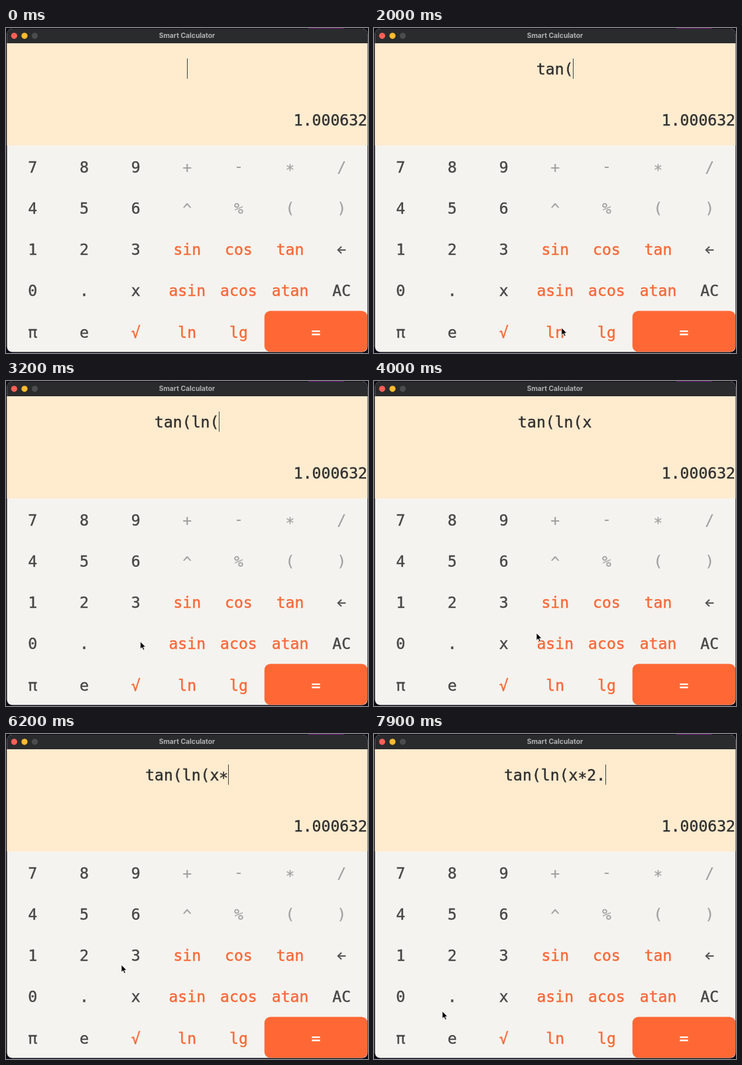
An HTML page for the animation above (8000 ms loop, 546x490 px).

```html
<!DOCTYPE html>
<html lang="en">
<head>
<meta charset="utf-8">
<title>Smart Calculator</title>
<style>
  html, body { margin: 0; width: 100%; height: 100%; overflow: hidden; background: #0d0b18; }
  svg { display: block; width: 546px; height: 490px; }
  text {
    font: 23.1px "DejaVu Sans Mono", "Noto Sans Mono", monospace; text-anchor: middle; white-space: pre;
    color: #303030; fill: currentColor; stroke: currentColor; stroke-width: .4px;
  }
  .digit { color: #474747; }
  .op { color: #a0a0a0; stroke-width: .2px; }
  .fn { color: #f86836; }
  .equals { color: #fff; }
  .back { font: 500 17px Inter, sans-serif; color: #474747; }
  .title { font: 700 10.3px Inter, sans-serif; color: #b1b1b2; stroke: none; }
</style>
</head>
<body>
<svg viewBox="0 0 546 490">
  <clipPath id="frame"><rect x="1.5" y="1" width="543.8" height="487.5" rx="8"/></clipPath>
  <path d="M456 .5H510" stroke="#6a1378"/>
  <g clip-path="url(#frame)">
    <rect width="546" height="490" fill="#f5f3ef"/>
    <rect width="546" height="23" fill="#2a2b2d"/>
    <rect y="23" width="546" height="154" fill="#ffebce"/>
    <rect x="389.8" y="426.4" width="155.5" height="62.1" rx="9" fill="#ff6835"/>
  </g>
  <circle cx="12.3" cy="11.8" r="4.6" fill="#fe5f57"/>
  <circle cx="27.9" cy="11.8" r="4.6" fill="#febc2e"/>
  <circle cx="43.4" cy="11.8" r="4.6" fill="#4b4c4e"/>
  <text class="title" x="273" y="15">Smart Calculator</text>
  <text id="entry" x="272.7" y="70"></text>
  <text x="545" y="147" style="text-anchor:end">1.000632</text>
  <path id="caret" d="M0 46V76.5" stroke="#444"/>
  <g id="keys"></g>
  <path id="pointer" d="M0 0V11.2L2.6 8.8 4.4 12.9 6.3 12.1 4.6 8.1H8Z" fill="#000" stroke="#fff" stroke-width=".8"/>
</svg>
<script>
const LOOP = 8000, FRAME = 100, BLINK = 530, CHAR = 13.91;
const HOLD = 200, ARRIVE = 250, LEAVE = 100; // ms before a label is typed
const $ = id => document.getElementById(id);

const rows = ['7 8 9 + - * /', '4 5 6 ^ % ( )', '1 2 3 sin cos tan ←', '0 . x asin acos atan AC', 'π e √ ln lg'];
const lift = { '*': -4, '-': 2, '^': -2, '←': 2 };
const kinds = [['back', /←/], ['equals', /=/], ['fn', /^(a?(sin|cos|tan)|l[ng]|√)$/], ['op', /^[-+*/^%()]$/], ['digit', /./]];

const keys = {};
function addKey(label, x, y) {
  const node = document.createElementNS('http://www.w3.org/2000/svg', 'text');
  node.setAttribute('class', kinds.find(([, test]) => test.test(label))[0]);
  node.setAttribute('x', x);
  node.setAttribute('y', y + 8.5 - (lift[label] || 0));
  node.textContent = label;
  $('keys').append(node);
  keys[label] = { node, x, y };
}

rows.forEach((row, r) => row.split(' ').forEach((label, c) => addKey(label, 40.3 + 77.65 * c, 209.3 + 62.2 * r)));
addKey('=', 467.5, 458.1);

// When each pressed key reaches the entry
const taps = [[1100, 'tan'], [1500, '('], [2300, 'ln'], [2700, '('], [3400, 'x'], [5700, '*'], [6500, '2'], [6800, '.']];

// The pointer visits every tapped key and wanders a little in between
const wander = [[100, 431, 422], [3700, 245, 380], [4600, 245, 380], [4900, 418, 289], [6200, 174, 348], [7600, 53, 430], [7900, 103, 418]];
const visits = taps.flatMap(([at, label]) => {
  const x = keys[label].x + 7, y = keys[label].y - 3;
  return [[at - ARRIVE, x, y], [at - LEAVE, x, y]];
});
const path = [...visits, ...wander].sort((a, b) => a[0] - b[0]);

function pointerAt(t) {
  const i = path.findIndex(stop => stop[0] > t);
  if (i < 1) return path.at(i).slice(1);
  const [t0, x0, y0] = path[i - 1], [t1, x1, y1] = path[i];
  const u = (t - t0) / (t1 - t0), k = u * u * (3 - 2 * u);
  return [x0 + (x1 - x0) * k, y0 + (y1 - y0) * k];
}

function show(node, on) {
  node.setAttribute('visibility', on ? 'visible' : 'hidden');
}

function draw(now) {
  const t = Math.floor(now % LOOP / FRAME) * FRAME;
  const done = taps.filter(([at]) => at <= t);
  const text = done.map(([, label]) => label).join('');
  const last = done.length ? done.at(-1)[0] : 0;

  $('entry').innerHTML = text.replace(/\*(.*)/, '<tspan dy="4">*</tspan><tspan dy="-4">$1</tspan>');
  $('caret').setAttribute('transform', `translate(${Math.floor(273 + text.length * CHAR / 2) + .5})`);
  show($('caret'), (t - last) % (2 * BLINK) < BLINK);

  // A key loses its label while it is held down
  const [at, held] = taps[done.length] || [Infinity];
  for (const label in keys) show(keys[label].node, label !== held || at - t > HOLD);

  $('pointer').setAttribute('transform', `translate(${pointerAt(t)})`);
  show($('pointer'), t >= path[0][0]);
}

const start = performance.now();
function tick() {
  draw(performance.now() - start);
  requestAnimationFrame(tick);
}
tick();
</script>
</body>
</html>
```
